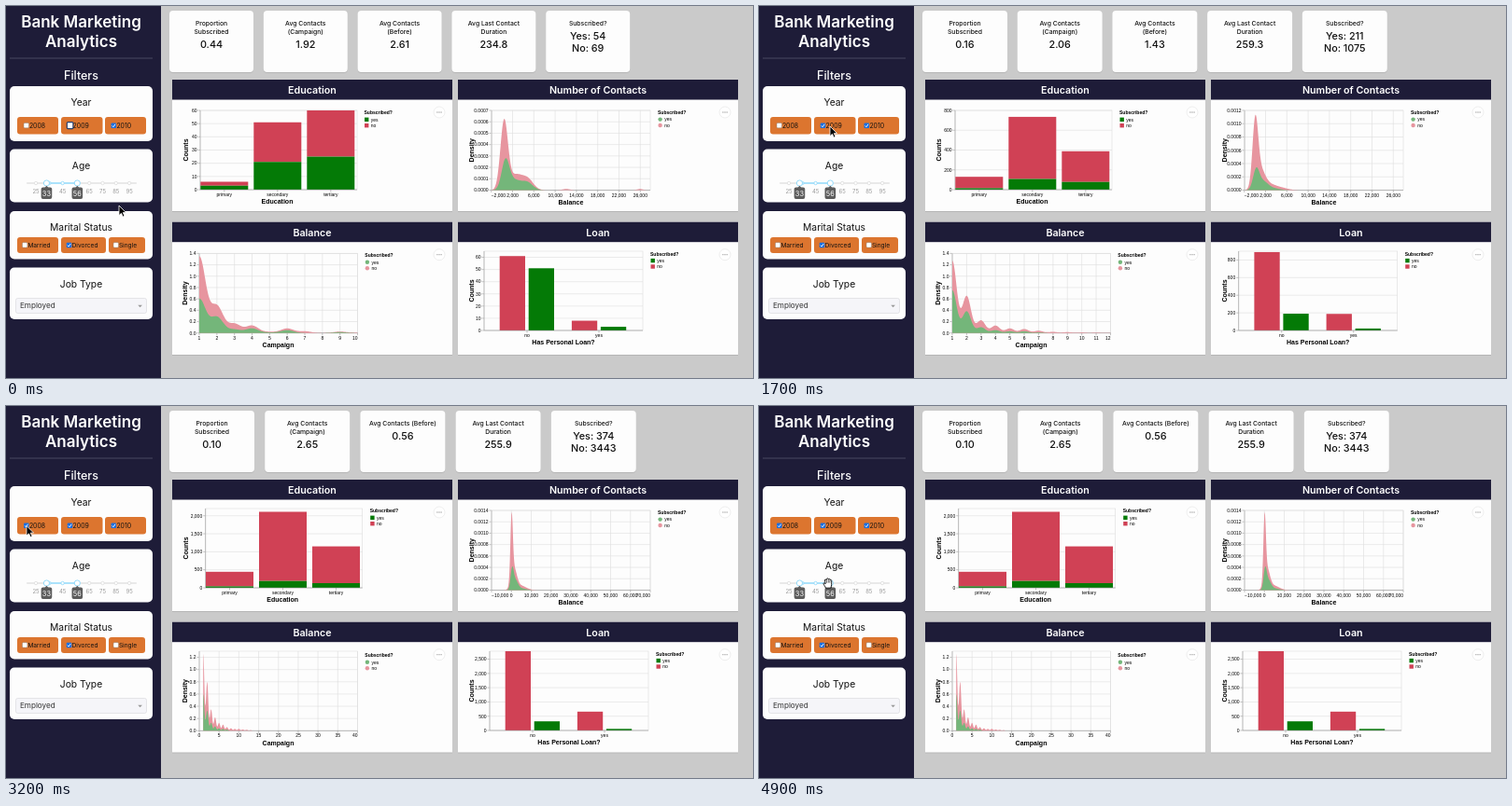
An HTML page for the animation above (5000 ms loop, 800 px wide and 399 px high).

```html
<!DOCTYPE html>
<html lang="en">
<head>
<meta charset="utf-8">
<title>Bank Marketing Analytics</title>
<style>
  html, body { margin: 0; width: 100%; height: 100%; overflow: hidden; background: #cacaca; }
  svg { display: block; }
  text { font-family: Inter, "Open Sans", sans-serif; }
  text.c { font-family: "Liberation Sans", sans-serif; }
</style>
</head>
<body>
<svg id="stage" width="800" height="399" viewBox="0 0 800 399" xmlns="http://www.w3.org/2000/svg"></svg>
<script>
const NAVY = '#1e1c38', ORANGE = '#dc752f', RED = '#d04155', GREEN = '#047a06';
const PINK = '#e7959f', LEAF = '#74b67a';
const LOOP = 5000;

const rect = (x, y, w, h, fill, more = '') =>
  `<rect x="${x}" y="${y}" width="${w}" height="${h}" fill="${fill}" ${more}/>`;
const line = (x1, y1, x2, y2, color = '#dddddd', w = .6) =>
  `<path d="M${x1} ${y1}L${x2} ${y2}" stroke="${color}" stroke-width="${w}" fill="none"/>`;
const circle = (x, y, r, fill, more = '') =>
  `<circle cx="${x}" cy="${y}" r="${r}" fill="${fill}" ${more}/>`;
const text = (x, y, s, size, { fill = '#111', weight = 400, anchor = 'middle', cls = '', more = '' } = {}) =>
  `<text x="${x}" y="${y}" font-size="${size}" fill="${fill}" font-weight="${weight}" text-anchor="${anchor}" class="${cls}" ${more}>${s}</text>`;
const label = (x, y, s, anchor = 'middle') => text(x, y, s, 5, { cls: 'c', anchor, fill: '#000' });
const bold = (x, y, s, size = 7, anchor = 'middle', more = '') =>
  text(x, y, s, size, { cls: 'c', weight: 700, fill: '#000', anchor, more });
const card = (x, y, w, h, r = 5) =>
  rect(x, y + 1, w, h, 'rgba(0,0,0,.1)', `rx="${r}"`) + rect(x, y, w, h, '#fdfdfd', `rx="${r}"`);

// Sidebar
function checkbox(x, y, on) {
  return on
    ? rect(x, y, 5.6, 5.6, '#1a6fe0', 'rx="1"') +
      `<path d="M${x + 1.2} ${y + 3}l1.2 1.3l2.1 -3" stroke="#fff" stroke-width=".9" fill="none"/>`
    : rect(x, y, 5.4, 5.4, '#fff', 'rx="1" stroke="#8a8078" stroke-width=".5"');
}

function option(x, y, w, h, boxX, name, size, on) {
  return rect(x, y, w, h, ORANGE, 'rx="3"') + checkbox(boxX, y + h / 2 - 2.8, on) +
    text(boxX + 5.9, y + h / 2 + 2.6, name, size, { anchor: 'start' });
}

function slider() {
  const at = age => 32 + 1.43 * (age - 25);
  let s = rect(22, 189, 118, 2, '#e9e9e9', 'rx="1"') + rect(at(33), 189, at(56) - at(33), 2, '#abe2fb');
  for (let age = 25; age <= 95; age += 10) {
    const on = age > 33 && age < 56;
    s += circle(at(age), 190, 1.7, '#fff', `stroke="${on ? '#96dbfa' : '#e0e0e0'}" stroke-width=".9"`);
    if (age !== 35 && age !== 55) s += text(at(age), 200.5, age, 6, { fill: '#999' });
  }
  for (const age of [33, 56]) {
    const x = at(age);
    s += circle(x, 190, 3.1, '#fff', 'stroke="#96dbfa" stroke-width="1"') +
      `<path d="M${x - 2} 195l2 -2.2l2 2.2z" fill="#5c5c5c"/>` +
      rect(x - 5.8, 194.5, 11.6, 12.5, '#5c5c5c', 'rx="2"') + text(x, 203.6, age, 7.4, { fill: '#fff' });
  }
  return s;
}

function sidebar() {
  const white = { fill: '#fff', weight: 600 };
  let s = rect(0, 0, 166, 399, NAVY) +
    text(80.5, 22.5, 'Bank Marketing', 17, white) + text(80.5, 43.8, 'Analytics', 17, white) +
    rect(4, 55, 153, 2, '#33324c') + text(80.5, 79, 'Filters', 12.5, { fill: '#fff', weight: 500 });
  for (const [y, h, name, base] of [
    [86, 59, 'Year', 107], [153.5, 57, 'Age', 175], [220, 51.5, 'Marital Status', 240.5], [280.5, 55.5, 'Job Type', 302]
  ]) s += rect(4, y, 153, h, '#fdfdfd', 'rx="5"') + text(80.5, base, name, 10.3);
  s += slider() +
    option(12, 248, 44, 17, 17.5, 'Married', 6.6, false) +
    option(59, 248, 48, 17, 64.7, 'Divorced', 6.6, true) +
    option(110, 248, 39, 17, 115, 'Single', 6.6, false);
  s += rect(10.5, 313.5, 140, 16, '#f5f5f9', 'rx="2" stroke="#dcdce0" stroke-width=".7"') +
    text(15, 324.4, 'Employed', 8.1, { anchor: 'start', fill: '#333' }) +
    `<path d="M141.3 320.8h4.6l-2.3 2.5z" fill="#999"/>`;
  return s;
}

function years(on8, on9) {
  return option(12, 119, 44, 18.5, 19, '2008', 6.9, on8) +
    option(59, 119, 44.5, 18.5, 65.7, '2009', 6.9, on9) +
    option(106, 119, 44, 18.5, 112.5, '2010', 6.9, true) +
    (on9 ? '' : rect(65.3, 124.6, 6.6, 7, '#fff', 'rx="1" stroke="#27406f" stroke-width="1.2"'));
}

// Charts
function axisY(x0, x1, y0, y1, max, step, fmt, name, titleX) {
  let s = '';
  for (let i = 0; i * step <= max * 1.0001; i++) {
    const y = y1 - (y1 - y0) * i * step / max;
    s += line(x0, y, x1, y) + line(x0 - 2.5, y, x0, y, '#888', .5) + label(x0 - 3.5, y + 1.8, fmt(i * step), 'end');
  }
  const cy = (y0 + y1) / 2;
  return s + rect(x0, y0, x1 - x0, y1 - y0, 'none', 'stroke="#ddd" stroke-width=".6"') +
    line(x0, y0, x0, y1, '#888', .5) + bold(titleX, cy, name, 7, 'middle', `transform="rotate(-90 ${titleX} ${cy})"`);
}

function axisX(x0, x1, y0, y1, ticks, flush) {
  let s = '';
  for (const [x, name] of ticks) {
    const start = flush && x - x0 < 1, end = x1 - x < 2;
    s += line(x, y0, x, y1) + line(x, y1, x, y1 + 2.5, '#888', .5) +
      label(end ? x1 : x, y1 + 7, name, start ? 'start' : end ? 'end' : 'middle');
  }
  return s + line(x0, y1, x1, y1, '#888', .5);
}

function legend(x, y, round) {
  const mark = (dy, fill) => round ? circle(x + 2.6, y + dy, 2.2, fill) : rect(x + .5, y + dy - 2.2, 4.4, 4.4, fill);
  return bold(x, y, 'Subscribed?', 5, 'start') +
    mark(5.6, round ? LEAF : GREEN) + mark(12, round ? PINK : RED) +
    label(x + 7.3, y + 7.3, 'yes', 'start') + label(x + 7.3, y + 13.7, 'no', 'start');
}

const commas = n => (n < 0 ? '\u2212' : '') + Math.abs(n).toLocaleString('en-US');

// Sum of bumps, each [centre, width, height]
const bumps = list => x => list.reduce((sum, [c, w, h]) => sum + h * Math.exp(-((x - c) ** 2) / (2 * w * w)), 0);

function area(f, x0, x1, y0, y1, max, fill) {
  let d = `M${x0} ${y1}`;
  for (let x = x0; x <= x1; x += .4) d += `L${x.toFixed(1)} ${(y1 - (y1 - y0) * f(x) / max).toFixed(2)}`;
  return `<path d="${d}L${x1} ${y1}z" fill="${fill}"/>`;
}

function education({ x, y, max, step, bars, legendX }) {
  const base = y + 85, k = 85 / max;
  let s = axisY(x, x + 168, y, base, max, step, commas, 'Counts', 194.5);
  ['primary', 'secondary', 'tertiary'].forEach((name, i) => {
    const [yes, all] = bars[i], bx = x + .3 + 57 * i;
    s += rect(bx, base - all * k, 51, (all - yes) * k, RED) + rect(bx, base - yes * k, 51, yes * k, GREEN) +
      line(bx + 25.5, base, bx + 25.5, base + 2.5, '#888', .5) + label(bx + 25.5, base + 6.8, name);
  });
  return s + line(x, base, x + 168, base, '#888', .5) + bold(x + 82.5, base + 15.4, 'Education') + legend(legendX, y + 4.2);
}

function contacts({ max, step, from, by, to, zero, scale, all, yes }) {
  const ticks = [];
  for (let v = from; v <= to; v += by) ticks.push([zero + v * scale, commas(v)]);
  return axisY(520, 690, 112, 197.5, max, step, v => v.toFixed(4), 'Density', 500.5) +
    axisX(520, 690, 112, 197.5, ticks, true) +
    area(bumps(all), 520, 690, 112, 197.5, max, PINK) + area(bumps(yes), 520, 690, 112, 197.5, max, LEAF) +
    bold(605, 213, 'Balance') + legend(698, 116, true);
}

function campaign({ y, max, first, last, by, width, all, yes }) {
  const x0 = 207, x1 = 376.5, base = y + 85.3, k = (x1 - x0) / (last - first);
  const at = v => x0 + (v - first) * k;
  const ticks = [];
  for (let v = first; v <= last; v += by) ticks.push([at(v), v]);
  const curve = list => bumps(list.map((h, i) => [at(i + 1), width * k, h]));
  return axisY(x0, x1, y, base, max, .2, v => v.toFixed(1), 'Density', 194.5) +
    axisX(x0, x1, y, base, ticks, false) +
    area(curve(all), at(1), x1, y, base, max, PINK) + area(curve(yes), at(1), x1, y, base, max, LEAF) +
    bold(291.5, base + 15.3, 'Campaign') + legend(384.3, 269.2, true);
}

function loan({ x, max, step, bars }) {
  const base = 348, k = 85 / max;
  let s = axisY(x, x + 170, 263, base, max, step, commas, 'Counts', 500.5);
  bars.forEach((v, i) => {
    const bx = x + 16.7 + 77.2 * (i >> 1) + 31 * (i & 1);
    s += rect(bx, base - v * k, 27.3, v * k, i & 1 ? GREEN : RED);
  });
  ['no', 'yes'].forEach((name, i) => {
    const cx = x + 46 + 77 * i;
    s += line(cx, base, cx, base + 2.5, '#888', .5) + label(cx, base + 6.8, name);
  });
  return s + line(x, base, x + 170, base, '#888', .5) + bold(x + 85, base + 15, 'Has Personal Loan?') + legend(x + 178, 267.5);
}

function stats({ pitch, w, values, counts, shortLabel }) {
  const heads = [['Proportion', 'Subscribed'], ['Avg Contacts', '(Campaign)'],
    shortLabel ? ['Avg Contacts (Before)'] : ['Avg Contacts', '(Before)'], ['Avg Last Contact', 'Duration'], ['Subscribed?']];
  const big = { weight: 500 };
  let s = '';
  heads.forEach((lines, i) => {
    const x = 175 + pitch * i, cx = x + w / 2, n = lines.length;
    s += card(x, 5, w, 66, 4);
    lines.forEach((t, j) => s += text(cx, 20.8 + 9 * j, t, 6.8, big));
    s += i < 4 ? text(cx, 27.4 + 9 * n, values[i], 10.8, big)
      : text(cx, 36.4, 'Yes: ' + counts[0], 10.8, big) + text(cx, 48.8, 'No: ' + counts[1], 10.8, big);
  });
  return s;
}

function panel(x, y, bottom, name) {
  const dots = [-2.1, 0, 2.1].map(d => circle(x + 286 + d, y + 35, .65, '#999')).join('');
  return rect(x, y + 1, 300, bottom - y, 'rgba(0,0,0,.1)') + rect(x, y, 300, bottom - y, '#fdfdfd') +
    rect(x, y, 300, 21.5, NAVY) + text(x + 150, y + 14.8, name, 10.7, { fill: '#fff', weight: 600 }) +
    circle(x + 286, y + 35, 6, '#fff', 'stroke="#e3e3e3" stroke-width=".6"') + dots;
}

const near = { from: -2000, by: 4000, to: 26000, zero: 531.1, scale: .0057 };
const views = [
  {
    stats: { pitch: 100.8, w: 90, values: ['0.44', '1.92', '2.61', '234.8'], counts: [54, 69] }, bottom: 374,
    education: { x: 208, y: 112, max: 60, step: 10, bars: [[3, 6], [21, 51], [25, 60]], legendX: 383.5 },
    contacts: { ...near, max: .0007, step: .0001,
      all: [[533.5, 4, .0006], [546, 7, .00013], [559, 6, .00009], [600, 4, .00001], [679, 3, .00001]],
      yes: [[535, 4.2, .00026], [545, 6, .00008], [558, 6, .00007]] },
    campaign: { y: 265.4, max: 1.4, first: 1, last: 10, by: 1, width: .36,
      all: [1.34, .47, .16, .13, .02, .08, .03, 0, .025, .008], yes: [.6, .28, .06, .08, .01, .05, 0, 0, .015] },
    loan: { x: 512, max: 65, step: 10, bars: [61, 51, 8, 3] }
  },
  {
    stats: { pitch: 101.7, w: 91, values: ['0.16', '2.06', '1.43', '259.3'], counts: [211, 1075] }, bottom: 374,
    education: { x: 210, y: 112, max: 800, step: 200, bars: [[15, 130], [108, 735], [78, 388]], legendX: 386 },
    contacts: { ...near, max: .0012, step: .0002,
      all: [[531.5, 3, .00097], [537, 5, .00028], [547, 7, .00008], [560, 7, .00003]],
      yes: [[532.5, 3.4, .0003], [540, 5, .00012], [550, 7, .00003]] },
    campaign: { y: 265.4, max: 1.4, first: 1, last: 12, by: 1, width: .3,
      all: [1.27, .65, .22, .13, .08, .07, .04, .02, .015, .01, .008, .005], yes: [.75, .38, .1, .05, .03, .03, .01] },
    loan: { x: 513.7, max: 900, step: 200, bars: [890, 190, 188, 22] }
  },
  {
    stats: { pitch: 102.2, w: 91, values: ['0.10', '2.65', '0.56', '255.9'], counts: [374, 3443], shortLabel: true }, bottom: 371.5,
    education: { x: 213.7, y: 110, max: 2200, step: 500, bars: [[40, 445], [190, 2110], [130, 1150]], legendX: 389.7 },
    contacts: { from: -10000, by: 10000, to: 70000, zero: 541.25, scale: .002125, max: .0014, step: .0002,
      all: [[541.5, 1.3, .0011], [544, 3, .00035], [551, 6, .00008]],
      yes: [[542, 1.6, .0003], [545, 3, .00018], [552, 5, .00003]] },
    campaign: { y: 263, max: 1.3, first: 0, last: 40, by: 5, width: .28,
      all: [1.26, .8, .35, .22, .13, .1, .06, .04, .03, .03, .02, .015, .01], yes: [.6, .33, .13, .07, .04, .03, .02] },
    loan: { x: 518, max: 2780, step: 500, bars: [2780, 320, 660, 55] }
  }
];

const dashboard = v => stats(v.stats) +
  panel(178, 79, 220, 'Education') + panel(484, 79, 220, 'Number of Contacts') +
  panel(178, 231.7, v.bottom, 'Balance') + panel(484, 231.7, v.bottom, 'Loan') +
  education(v.education) + contacts(v.contacts) + campaign(v.campaign) + loan(v.loan);

const arrow = `<path d="M0 0V10.6L2.5 8.3L4.2 12.1L6 11.3L4.3 7.6H7.6Z" fill="#000" stroke="#fff" stroke-width=".8"/>`;
const hand = `<path d="M-2.6 5.2C-3 3.4-5.2 1.4-4.9.3C-4.6-.6-3.4 0-2.8.8L-3.5-3C-3.6-4.3-2.2-4.5-1.9-3.3L-1.5-4.4C-1.2-5.5.2-5.4.3-4.2C.8-5.1 2-4.7 2-3.5C2.7-4.1 3.8-3.6 3.7-2.4C3.6 1 4 2.4 2.8 5.2Z" fill="#fff" stroke="#000" stroke-width=".9" stroke-linejoin="round"/>
  <path d="M-1.8-3.2l.5 3M.3-4v3.6M2-3.4l-.2 3" stroke="#000" stroke-width=".6" fill="none"/>`;

const stage = document.getElementById('stage');
stage.innerHTML = sidebar() +
  [[false, false], [false, true], [true, true]].map(on => `<g class="years">${years(...on)}</g>`).join('') +
  views.map(v => `<g class="view">${dashboard(v)}</g>`).join('') +
  `<g id="pointer"><g id="arrow">${arrow}</g><g id="hand">${hand}</g></g>`;

// Pointer stops: [ms, x, y]
const path = [[0, 121, 214], [100, 121, 214], [700, 76, 129], [1900, 76, 129], [2500, 22, 128.5], [3400, 22, 128.5],
  [3900, 93, 134.5], [4300, 93, 134.5], [4800, 74, 190], [LOOP, 74, 190]];

function pointerAt(t) {
  const i = path.findIndex(p => p[0] > t), [t0, x0, y0] = path[i - 1], [t1, x1, y1] = path[i];
  const u = (t - t0) / (t1 - t0), e = u * u * (3 - 2 * u);
  return [x0 + (x1 - x0) * e, y0 + (y1 - y0) * e];
}

const pick = (t, times) => times.filter(s => t >= s).length;
const show = (el, on) => el.style.display = on ? '' : 'none';
const pointer = document.getElementById('pointer');
const yearSets = stage.querySelectorAll('.years'), viewSets = stage.querySelectorAll('.view');

function draw(now) {
  let t = Math.floor(now % LOOP / 100) * 100;
  if (t < 200) t = 0;
  const year = pick(t, [1200, 2900]), view = pick(t, [1500, 3200]);
  yearSets.forEach((g, i) => show(g, i === year));
  viewSets.forEach((g, i) => show(g, i === view));
  pointer.setAttribute('transform', `translate(${pointerAt(t)})`);
  show(document.getElementById('arrow'), t < 4700);
  show(document.getElementById('hand'), t >= 4700);
}

const start = performance.now();
function tick() {
  draw(performance.now() - start);
  requestAnimationFrame(tick);
}
tick();
</script>
</body>
</html>
```
